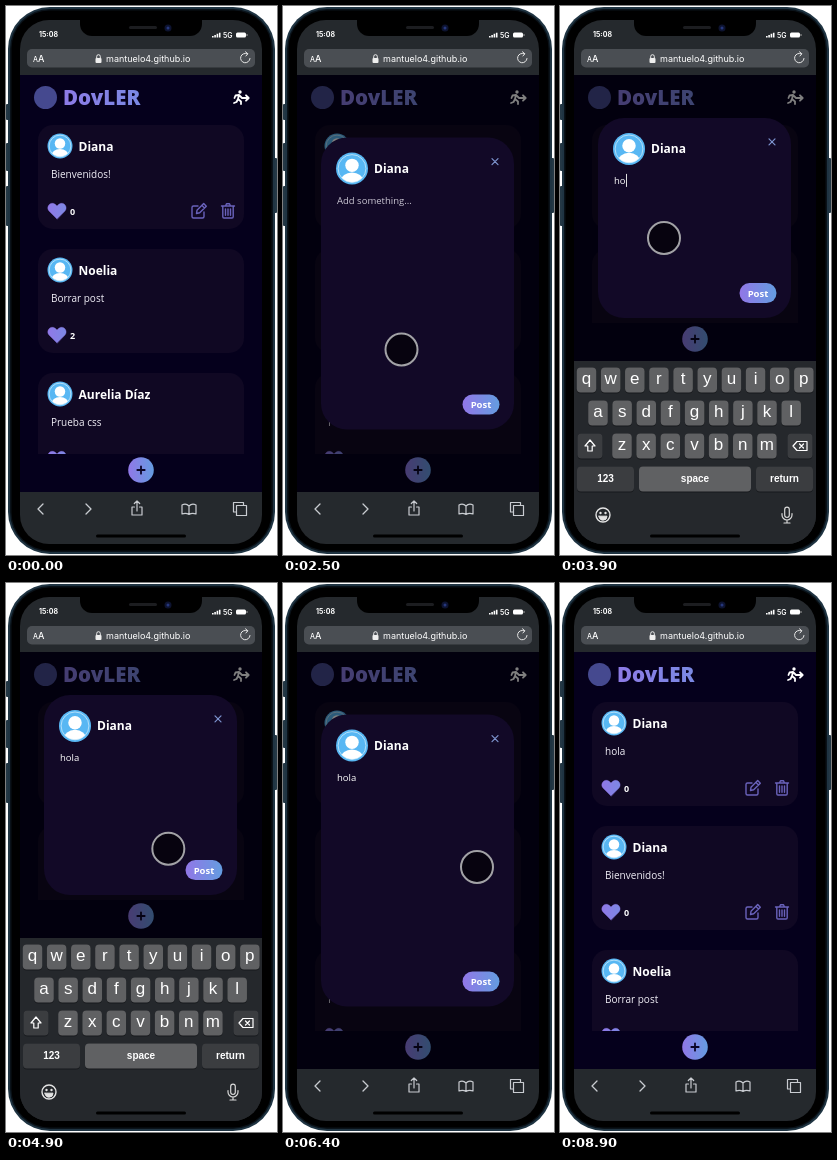
An HTML page with a canvas for the animation above (9500 ms loop, 271 px wide and 549 px high).

```html
<!DOCTYPE html>
<html lang="es">
<head>
<meta charset="utf-8">
<style>
  html, body { margin: 0; width: 100%; height: 100%; overflow: hidden; background: #fff; }
  canvas { display: block; width: 271px; height: 549px; }
</style>
</head>
<body>
<canvas id="stage" width="271" height="549"></canvas>
<script>
const ctx = document.getElementById('stage').getContext('2d');
const LOOP = 9500, PAGE_TOP = 69, PAGE_END = 486, SCREEN_END = 538;
const BODY = '"Open Sans", sans-serif', UI = 'Inter, sans-serif', KEYS = '"Liberation Sans", Arial, sans-serif';
const PAGE = '#05001c', CHROME = '#25292d', VIOLET = '#9177e7', BLUE = '#649ce0';

const me = 'Diana';
const posts = [
  { name: me, text: 'Bienvenidos!', likes: 0, own: true },
  { name: 'Noelia', text: 'Borrar post', likes: 2 },
  { name: 'Aurelia Díaz', text: 'Prueba css', likes: 0 }
];
const newPost = { name: me, text: 'hola', likes: 0, own: true };

// Pointer moves: start, end, x, y
const moves = [
  [400, 600, 168, 340],
  [800, 1200, 140, 436],
  [1300, 1600, 133, 455],
  [2400, 2600, 104, 232],
  [4600, 5100, 194, 284],
  [6700, 7000, 198, 402],
  [8100, 8300, 212, 372]
];

function box(x, y, w, h, r, fill) {
  ctx.beginPath();
  ctx.roundRect(x, y, w, h, r);
  ctx.fillStyle = fill;
  ctx.fill();
}
function disc(x, y, r, fill) {
  ctx.beginPath();
  ctx.arc(x, y, r, 0, 7);
  ctx.fillStyle = fill;
  ctx.fill();
}
function ring(x, y, r, color, width = 1) {
  ctx.beginPath();
  ctx.arc(x, y, r, 0, 7);
  ctx.strokeStyle = color;
  ctx.lineWidth = width;
  ctx.stroke();
}
function label(text, x, y, font, fill = '#fff', align = 'left') {
  ctx.font = font;
  ctx.textAlign = align;
  ctx.fillStyle = fill;
  ctx.fillText(text, x, y);
}
function line(x, y, path, color, width = 1.2, fill) {
  const p = new Path2D(path);
  ctx.save();
  ctx.translate(x, y);
  ctx.lineCap = ctx.lineJoin = 'round';
  ctx.lineWidth = width;
  ctx.strokeStyle = color;
  if (fill) { ctx.fillStyle = fill; ctx.fill(p); }
  ctx.stroke(p);
  ctx.restore();
}
function blend(x0, x1) {
  const g = ctx.createLinearGradient(x0, 0, x1, 0);
  g.addColorStop(0, VIOLET);
  g.addColorStop(1, BLUE);
  return g;
}

function drawPhone() {
  ctx.fillStyle = '#fff';
  ctx.fillRect(0, 0, 271, 549);
  for (const [y, h] of [[98, 16], [137, 28], [180, 40]]) box(0, y, 4, h, 1, '#243845');
  box(267, 152, 4, 55, 1, '#243845');
  box(2, 1, 267, 547, 42, '#1f3442');
  box(4, 3, 263, 543, 40, '#0a1219');
  box(5.5, 4.5, 260, 540, 38, '#000');
}

function drawTopBar() {
  ctx.fillStyle = CHROME;
  ctx.fillRect(14, 14, 242, 55);
  box(74, 2, 122, 28, 12, '#000');
  box(123, 20, 28, 3, 1.5, '#1c1d20');
  disc(162, 22, 3.5, '#0d1330');
  disc(162, 22, 1.5, '#26377c');
  label('15:08', 33, 31, '700 7px ' + UI);
  for (let i = 0; i < 4; i++) box(206 + i * 2.3, 30 - i * 1.1, 1.6, 1.5 + i * 1.1, 0, '#fff');
  label('5G', 217, 31.5, '600 7px ' + UI);
  box(230, 26.5, 10, 5, 1.5, '#fff');
  box(240.5, 28, 1, 2, 0.5, '#aaa');

  box(21, 43, 228, 18.5, 5, '#4a4e53');
  label('A', 27, 56, '500 7px ' + UI);
  label('A', 32, 56, '500 9px ' + UI);
  box(89.5, 52, 6, 5, 1, '#eee');
  line(92.5, 52, 'M-1.8 0V-1.5A1.8 1.8 0 0 1 1.8 -1.5V0', '#eee', 1);
  label('mantuelo4.github.io', 100, 56, '400 9px ' + UI);
  line(239.5, 52, 'M4.5 .5A4.7 4.7 0 1 1 1.8 -4.2M0 -6.2L2.4 -4.2L.4 -2', '#e8e8e8', 1);
}

function drawToolbar() {
  const c = '#c9ccd1';
  ctx.fillStyle = CHROME;
  ctx.fillRect(14, PAGE_END, 242, SCREEN_END - PAGE_END);
  line(35, 503, 'M2 -5L-3 0L2 5', c, 1.3);
  line(82, 503, 'M-2 -5L3 0L-2 5', c, 1.3);
  line(131, 503, 'M-2.5 -2H-5V6H5V-2H2.5M0 2V-8M-2.7 -5.5L0 -8L2.7 -5.5', c);
  line(183, 503, 'M0 -3Q-3 -6 -7 -4V5Q-3 3.5 0 5.5Q3 3.5 7 5V-4Q3 -6 0 -3V5.5', c);
  line(234, 503, 'M-3.5 3H-6.5V-6.5H3.5V-3.5M-3.5 -3.5H6.5V6.5H-3.5Z', c);
}

function drawAvatar(x, y, r) {
  disc(x, y, r, '#58b7f3');
  ctx.save();
  ctx.beginPath();
  ctx.arc(x, y, r * 0.86, 0, 7);
  ctx.clip();
  disc(x, y - r * 0.2, r * 0.42, '#fff');
  ctx.beginPath();
  ctx.ellipse(x, y + r * 0.82, r * 0.7, r * 0.58, 0, 0, 7);
  ctx.fillStyle = '#fff';
  ctx.fill();
  ctx.restore();
  ring(x, y, r * 0.87, '#d8effc', 0.7);
}

function drawCard(post, y) {
  box(32, y, 206, 104, 15, '#100823');
  drawAvatar(54, y + 21, 12.5);
  label(post.name, 72.5, y + 26, '700 12px ' + BODY);
  label(post.text, 45, y + 53, '500 10px ' + BODY, '#f1eff7');
  const heart = 'M0 8L-8 0C-11.5 -4 -6.5 -10.5 -1.5 -6.5L0 -5L1.5 -6.5C6.5 -10.5 11.5 -4 8 0Z';
  line(51, y + 86, heart, VIOLET, 0.4, blend(-10, 30));
  label(post.likes, 64, y + 90, '700 9px ' + BODY);
  if (!post.own) return;
  const c = '#6962bb';
  line(193, y + 86, 'M-1 -5H-5.5Q-7 -5 -7 -3.5V5.5Q-7 7 -5.5 7H3.5Q5 7 5 5.5V1M-2.5 2.5L-2 -.7L4.7 -7.4L7.3 -4.8L.7 1.8ZM3 -5.5L5.5 -3', c, 1.4);
  line(222, y + 86, 'M-6.5 -5H6.5M-2.5 -5L-1.5 -7.3H1.5L2.5 -5M-5.2 -5V5.7Q-5.2 7 -4 7H4Q5.2 7 5.2 5.7V-5M-2.5 -2V4.3M0 -2V4.3M2.5 -2V4.3', c, 1.4);
}

function drawPage(bottom, list) {
  ctx.fillStyle = PAGE;
  ctx.fillRect(14, PAGE_TOP, 242, bottom - PAGE_TOP);
  disc(39.5, 91.5, 11.5, '#45498f');
  label('DovLER', 57, 98.5, '800 20.5px ' + BODY, blend(40, 230));
  disc(234, 86, 1.7, '#fff');
  line(234, 91, 'M-1 -2L-2 2L1 4.5V7M-2 2L-3.5 5L-6 6M-1 -2L-4.5 -1.5L-5.5 1M-1 -2L2 1H8.5M6 -1.7L8.7 1L6 3.7', '#fff', 1.8);

  ctx.save();
  ctx.beginPath();
  ctx.rect(14, 110, 242, bottom - 38 - 110);
  ctx.clip();
  list.slice(0, 3).forEach((post, i) => drawCard(post, 119 + i * 124));
  ctx.restore();

  const y = bottom - 22;
  disc(135, y, 12.8, blend(122, 148));
  line(135, y, 'M-3.7 0H3.7M0 -3.7V3.7', '#0b0526', 1.8);
}

function drawModal(bottom, text, caret) {
  const space = bottom - PAGE_TOP, top = PAGE_TOP + space * 0.15, h = space * 0.7;
  ctx.fillStyle = 'rgba(0,0,0,.5)';
  ctx.fillRect(14, PAGE_TOP, 242, space);
  box(38, top, 193, h, 26, '#120927');
  drawAvatar(69, top + 31, 16);
  label(me, 91, top + 35, '700 12px ' + BODY);
  line(212, top + 24, 'M-3 -3L3 3M3 -3L-3 3', '#7d94cf', 1.2);
  const font = '500 9.5px ' + BODY;
  label(text || 'Add something...', 54, top + 66, font, text ? '#fff' : '#c9c5d2');
  if (caret) {
    const x = 54 + (text ? ctx.measureText(text).width + 0.5 : -0.5);
    ctx.fillStyle = '#ddd';
    ctx.fillRect(Math.round(x), top + 56, 1, 13);
  }
  const y = top + h - 35;
  box(179.5, y, 37, 20, 10, blend(180, 216));
  label('Post', 198, y + 13.5, '700 9.5px ' + BODY, '#fff', 'center');
}

function drawKey(text, cx, cy, w, dark, small) {
  box(cx - w / 2, cy - 12.5, w, 26, 4, '#17191c');
  box(cx - w / 2, cy - 12.5, w, 25, 4, dark ? '#3b3d40' : '#606163');
  if (text) label(text, cx, cy + (small ? 3 : 4), (small ? '700 10px ' : '400 17px ') + KEYS, '#fff', 'center');
}

function drawKeyboard(top) {
  ctx.fillStyle = '#25282c';
  ctx.fillRect(14, top, 242, SCREEN_END + 60 - top);
  const rows = [['qwertyuiop', 26.5], ['asdfghjkl', 38], ['zxcvbnm', 62]];
  rows.forEach(([keys, x], r) => {
    [...keys].forEach((k, i) => drawKey(k, x + i * 24.15, top + 19 + r * 33, 19.5));
  });
  const y3 = top + 85, y4 = top + 118;
  drawKey('', 30, y3, 25, true);
  line(30, y3, 'M0 -6L5 0H2.2V5H-2.2V0H-5Z', '#fff', 1.2);
  drawKey('', 240, y3, 25, true);
  line(240, y3, 'M-7 0L-3 -4.5H7V4.5H-3ZM-.5 -2L3.5 2M3.5 -2L-.5 2', '#fff', 1.2);
  drawKey('123', 45.5, y4, 57, true, true);
  drawKey('space', 135, y4, 112, false, true);
  drawKey('return', 224.5, y4, 57, true, true);

  const y = top + 154;
  ring(43, y, 7, '#e3e3e3', 1.4);
  disc(40.5, y - 2, 1.2, '#e3e3e3');
  disc(45.5, y - 2, 1.2, '#e3e3e3');
  line(43, y, 'M-4 1.2H4A4 4 0 0 1 -4 1.2Z', '#e3e3e3', 1, '#e3e3e3');
  line(227, y, 'M-2.3 -5.5A2.3 2.3 0 0 1 2.3 -5.5V0A2.3 2.3 0 0 1 -2.3 0ZM-5 -1.5V0A5 5 0 0 0 5 0V-1.5M0 5V8M-3 8H3', '#d9d9d9', 1.2);
}

function drawPointer(t) {
  if (t < 500 || t >= 8900) return;
  let x = 176, y = 318;
  for (const [start, end, tx, ty] of moves) {
    const p = Math.min(1, Math.max(0, (t - start) / (end - start)));
    const e = p * p * (3 - 2 * p);
    x += (tx - x) * e;
    y += (ty - y) * e;
  }
  disc(x, y, 16, 'rgba(0,0,0,.62)');
  ring(x, y, 16, '#a2a2a6', 2);
}

function keyboardTop(t) {
  if (t < 2800 || t >= 6400) return SCREEN_END;
  if (t < 3100) return [470, 407, 371][(t - 2800) / 100];
  return t < 6200 ? 355 : t < 6300 ? 407 : 465;
}

function typed(t) {
  return 'hola'.slice(0, [3600, 3900, 4100, 4200].filter(at => t >= at).length);
}

function caretOn(t) {
  return [[2900, 3400], [3600, 4700], [5300, 5800]].some(([a, b]) => t >= a && t < b);
}

function draw(t) {
  const kb = keyboardTop(t), bottom = Math.min(PAGE_END, kb);
  drawPhone();
  ctx.save();
  ctx.beginPath();
  ctx.roundRect(14, 14, 242, SCREEN_END - 14, 29);
  ctx.clip();
  drawTopBar();
  drawToolbar();
  drawPage(bottom, t >= 7600 ? [newPost, ...posts] : posts);
  if (t >= 2100 && t < 7500) drawModal(bottom, typed(t), caretOn(t));
  if (kb < SCREEN_END) drawKeyboard(kb);
  box(90, 528.5, 90, 3, 1.5, '#000');
  drawPointer(t);
  ctx.restore();
}

function tick() {
  draw(Math.floor(performance.now() % LOOP / 100) * 100);
  requestAnimationFrame(tick);
}
tick();
</script>
</body>
</html>
```
